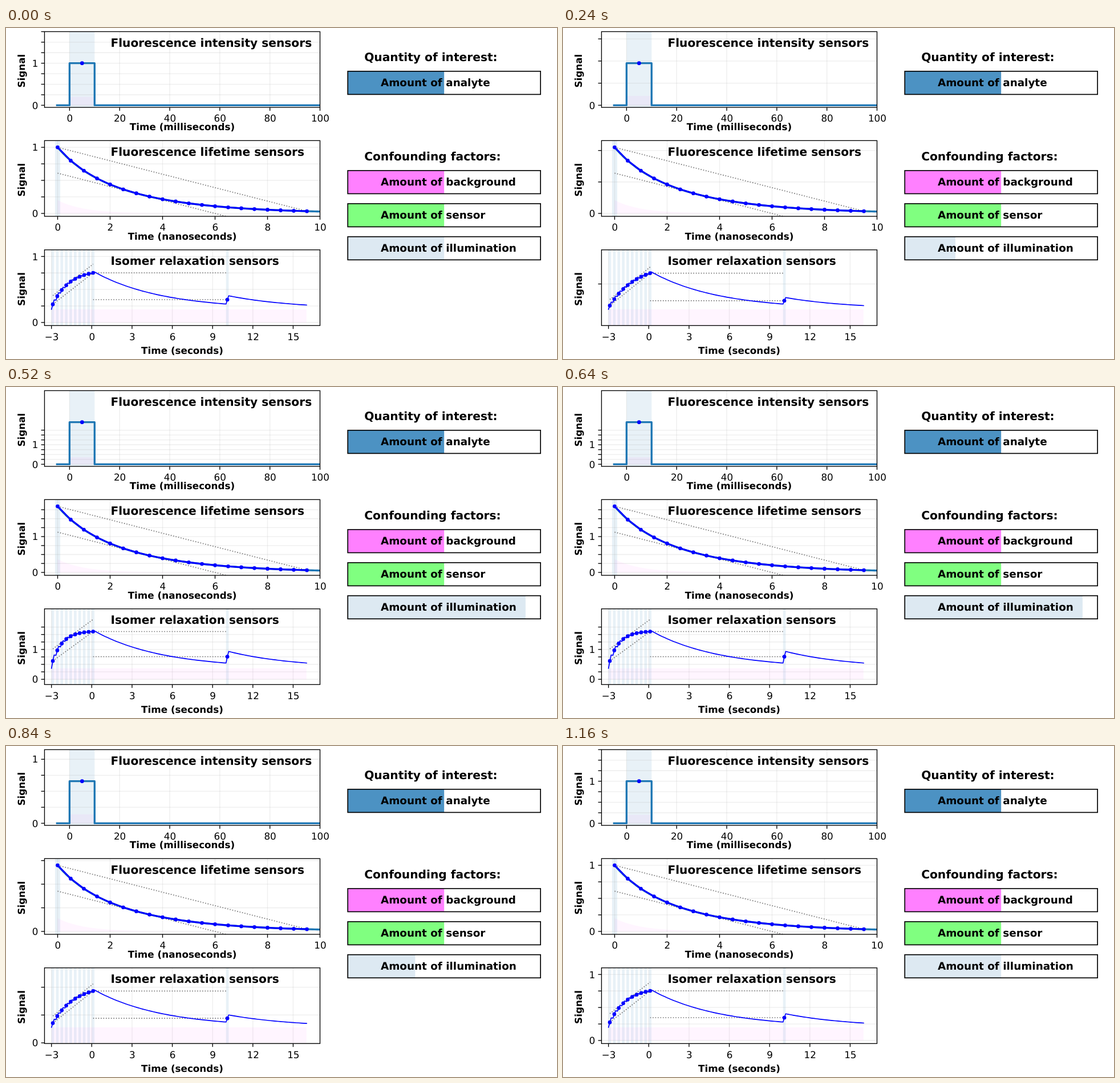
Animation of 966x580 px, one loop 1.4 s. Source, as an HTML page:

```html
<!DOCTYPE html>
<html lang="en">
<head>
<meta charset="utf-8">
<title>Sensor signals under varying illumination</title>
<style>
  html, body { margin: 0; width: 100%; height: 100%; overflow: hidden; background: #fff; }
  svg { display: block; width: 966px; height: 580px; }
  text { font: 16.77px "DejaVu Sans", sans-serif; text-rendering: geometricPrecision; }
  .mid { text-anchor: middle; }
  .end { text-anchor: end; }
  .label { font-weight: bold; }
  .head { font-size: 20.18px; font-weight: bold; }
  .name { font-size: 18.38px; font-weight: bold; }
  .frame, .tick { fill: none; stroke: #000; stroke-width: 1.34; }
  .box { fill: none; stroke: #000; stroke-width: 1.68; }
  .grid { stroke: #b0b0b0; stroke-opacity: .22; stroke-width: 1.34; }
  .light { fill: #1f77b4; fill-opacity: .1; }
  .back { fill: #f0f; fill-opacity: .04; }
  .line { fill: none; stroke-linejoin: round; stroke-linecap: square; }
  .teal { stroke: #1f77b4; stroke-width: 3.35; }
  .bold { stroke: #00f; stroke-width: 2.9; }
  .thin { stroke: #00f; stroke-width: 1.68; }
  .dots { fill: none; stroke: #777; stroke-width: 1.68; stroke-dasharray: 1.68 2.77; }
  .dot { fill: #00f; }
</style>
</head>
<body>
<svg id="stage" viewBox="0 0 966 580"></svg>
<script>
const LEFT = 67.5, WIDTH = 483, HEIGHT = 132.7;
const STEP = 40, STEPS = 29, LOOP = 1400;
const DECAY = 0.2, PULSE = 0.2;

const range = (n, f) => Array.from({ length: n }, (_, i) => f(i));
const pulseStarts = [...range(10, i => -3 + i / 3), 10];

const plots = [
  { top: 6.4, title: 'Fluorescence intensity sensors', label: 'Time (milliseconds)', drop: 40.3,
    min: -10, max: 100, ticks: range(6, i => i * 20), lit: [[0, 10]], draw: drawIntensity },
  { top: 197.3, title: 'Fluorescence lifetime sensors', label: 'Time (nanoseconds)', drop: 41,
    min: -0.5, max: 10, ticks: range(6, i => i * 2), lit: [[-0.1, 0.1]], draw: drawLifetime },
  { top: 388.7, title: 'Isomer relaxation sensors', label: 'Time (seconds)', drop: 49.4,
    min: -3.52, max: 17, ticks: range(7, i => i * 3 - 3),
    lit: pulseStarts.map(s => [s, s + PULSE]), draw: drawIsomer }
];

const bars = [
  { y: 75.8, name: 'analyte', fill: '#4c92c3' },
  { y: 249.8, name: 'background', fill: '#ff80ff' },
  { y: 307.8, name: 'sensor', fill: '#80ff80' },
  { y: 365.7, name: 'illumination', fill: '#dde9f2', id: 'level' }
];
const BAR_X = 599.2, BAR_W = 337.9, BAR_H = 40.6;

// Markup helpers
const rect = (cls, x, y, w, h, more = '') =>
  `<rect class="${cls}" x="${x}" y="${y}" width="${w}" height="${h}" ${more}/>`;
const seg = (cls, x1, y1, x2, y2) =>
  `<line class="${cls}" x1="${x1}" y1="${y1}" x2="${x2}" y2="${y2}"/>`;
const text = (cls, x, y, s, more = '') => `<text class="${cls}" x="${x}" y="${y}" ${more}>${s}</text>`;
const path = (cls, pts) =>
  `<path class="${cls}" d="M${pts.map(p => p[0].toFixed(2) + ' ' + p[1].toFixed(2)).join('L')}"/>`;
const dot = ([x, y]) => `<circle class="dot" cx="${x}" cy="${y}" r="3.35"/>`;

const toX = (p, t) => LEFT + (t - p.min) / (p.max - p.min) * WIDTH;

function plotMarkup(p, i) {
  const bottom = p.top + HEIGHT, mid = LEFT + WIDTH / 2, side = p.top + 68.8;
  const spans = p.lit.map(([a, b]) =>
    rect('light', toX(p, a), p.top, toX(p, b) - toX(p, a), HEIGHT)).join('');
  const grid = p.ticks.map(t => seg('grid', toX(p, t), p.top, toX(p, t), bottom)).join('');
  const ticks = p.ticks.map(t => seg('tick', toX(p, t), bottom, toX(p, t), bottom + 5.9) +
    text('mid', toX(p, t) + 0.4, bottom + 25.2, String(t).replace('-', '\u2212'))).join('');
  return `<clipPath id="clip${i}">${rect('', LEFT, p.top, WIDTH, HEIGHT)}</clipPath>
    <g clip-path="url(#clip${i})">${spans}${grid}<g id="data${i}"></g></g>
    <g id="axis${i}"></g>${rect('frame', LEFT, p.top, WIDTH, HEIGHT)}${ticks}` +
    text('label mid', mid, bottom + p.drop, p.label) +
    text('label mid', 0, 0, 'Signal', `transform="translate(33.4 ${side}) rotate(-90)"`) +
    text('head', 183.4, p.top + HEIGHT * 0.2, p.title);
}

const barMarkup = b =>
  rect('', BAR_X, b.y, BAR_W / 2, BAR_H, `fill="${b.fill}" ${b.id ? `id="${b.id}"` : ''}`) +
  rect('box', BAR_X, b.y, BAR_W, BAR_H) +
  text('name', 657, b.y + 26.3, 'Amount of ' + b.name);

document.getElementById('stage').innerHTML =
  plots.map(plotMarkup).join('') + bars.map(barMarkup).join('') +
  text('head', 628.2, 58, 'Quantity of interest:') +
  text('head', 628.2, 232, 'Confounding factors:');

// Chord through the end points, and its parallel through the farthest point
function chordPair(pts) {
  const [a, b] = [pts[0], pts[pts.length - 1]];
  const slope = (b[1] - a[1]) / (b[0] - a[0]);
  const gap = pts.map(([x, y]) => y - a[1] - slope * (x - a[0]))
    .reduce((m, g) => Math.abs(g) > Math.abs(m) ? g : m, 0);
  return path('dots', [a, b]) + path('dots', [[a[0], a[1] + gap], [b[0], b[1] + gap]]);
}

// Each draw function returns the data markup and the value-to-y mapping
function drawIntensity(p, r) {
  const peak = r * (0.8 + 0.2 * r);
  const y = v => p.top + (1.75 - v / peak) * HEIGHT / 1.8;
  const pts = [[-5, 0], [0, 0], [0, peak], [10, peak], [10, 0], [100, 0]]
    .map(([t, v]) => [toX(p, t), y(v)]);
  const back = rect('back', toX(p, 0), y(0.2 * r), toX(p, 10) - toX(p, 0), y(0) - y(0.2 * r));
  return { y, data: back + path('line teal', pts) + dot([toX(p, 5), y(peak)]) };
}

function drawLifetime(p, r) {
  const y = v => 324.9 - 115.8 * v / r;
  const noise = t => 0.2 * r * Math.exp(-t);
  const at = t => [toX(p, t), y(noise(t) + 0.8 * r * Math.exp(-t / 3))];
  const marks = range(20, i => at(i / 2));
  const back = [...range(51, i => [toX(p, i / 5), y(noise(i / 5))]), [toX(p, 10), y(0)], [toX(p, 0), y(0)]];
  return { y, data: path('back', back) + chordPair(marks) +
    path('line teal', range(101, i => at(i / 10))) +
    path('line bold', marks) + marks.map(dot).join('') };
}

function drawIsomer(p, r) {
  let s = 0, t = -3;
  const raw = [[t, s]], hits = [];
  const go = (dt, lit) => {
    const rate = (lit ? r : 0) + DECAY, goal = lit ? 0.8 * r / rate : 0;
    s = goal + (s - goal) * Math.exp(-rate * dt);
    t += dt;
    raw.push([t, s]);
  };
  const rest = until => {
    const n = Math.ceil((until - t) / 0.2), dt = (until - t) / n;
    for (let i = 0; i < n; i++) go(dt, false);
  };
  for (const start of pulseStarts) {
    if (start > t + 1e-6) rest(start);
    go(PULSE / 2, true);
    hits.push([t, s]);
    go(PULSE / 2, true);
  }
  rest(16);

  const top = Math.max(...raw.map(q => q[1]));
  const y = v => 492.9 - 65.4 * (v / r - 0.2) / top;
  const place = ([t, s]) => [toX(p, t), y(r * (0.2 + s))];
  const marks = hits.map(place), last = marks[9], probe = marks[10];
  const back = rect('back', toX(p, -3), y(0.2 * r), toX(p, 16) - toX(p, -3), y(0) - y(0.2 * r));
  return { y, data: back + chordPair(marks.slice(0, 10)) +
    path('dots', [last, [probe[0], last[1]]]) + path('dots', [[last[0], probe[1]], probe]) +
    path('line thin', raw.map(place)) + marks.map(dot).join('') };
}

function render(step) {
  const r = 2 ** -Math.sin(3 * Math.PI * step / STEPS);
  plots.forEach((p, i) => {
    const { y, data } = p.draw(p, r);
    const ticks = range(8, k => k / 4).filter(v => y(v) > p.top - 0.1 && y(v) < p.top + HEIGHT);
    const lines = ticks.map(v => seg('grid', LEFT, y(v), LEFT + WIDTH, y(v))).join('');
    document.getElementById('data' + i).innerHTML = lines + data;
    document.getElementById('axis' + i).innerHTML = ticks.map(v =>
      seg('tick', LEFT - 5.9, y(v), LEFT, y(v)) +
      (v % 1 ? '' : text('end', LEFT - 11.2, y(v) + 6.2, v))).join('');
  });
  document.getElementById('level').setAttribute('width', BAR_W * r / 2);
}

const begin = performance.now();
let shown = -1;
function tick() {
  const time = Math.max(0, performance.now() - begin) % LOOP;
  const step = Math.min(STEPS, Math.floor(time / STEP));
  if (step !== shown) render(shown = step);
  requestAnimationFrame(tick);
}
tick();
</script>
</body>
</html>
```
